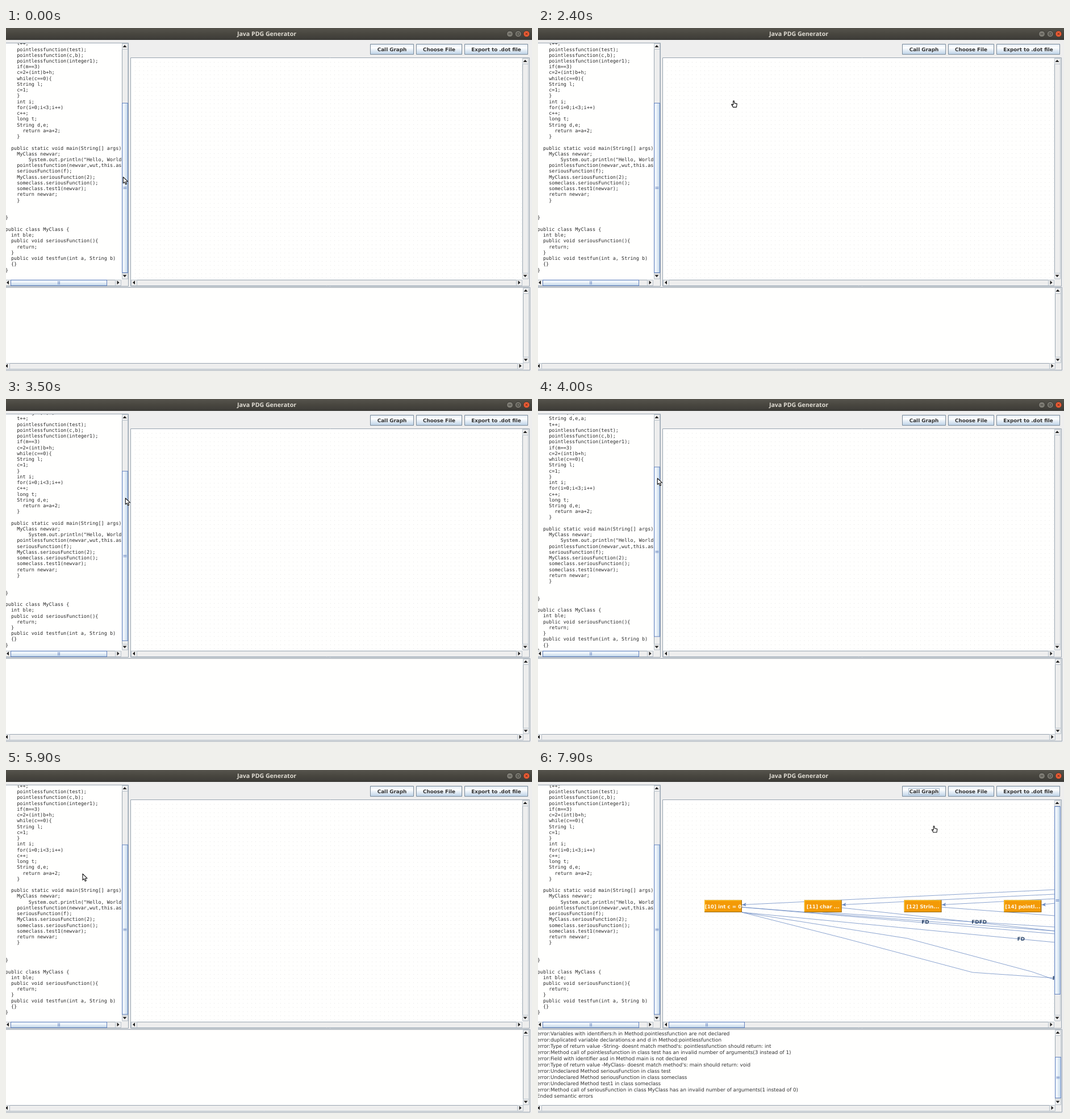
An HTML page with a canvas for the animation above (8000 ms loop, 926 px wide and 605 px high).

```html
<!DOCTYPE html>
<html lang="en">
<head>
<meta charset="utf-8">
<title>Java PDG Generator</title>
<style>
html, body { margin: 0; width: 100%; height: 100%; overflow: hidden; background: #eee; }
canvas { display: block; }
</style>
</head>
<body>
<canvas id="stage" width="926" height="605"></canvas>
<script>
const ctx = document.getElementById('stage').getContext('2d');
ctx.textRendering = 'geometricPrecision';
ctx.lineJoin = 'round';

const LOOP = 8000, STEP = 100, ROW = 10.237;
const EDGE = '#7a8a99', LINE = '#98a4b0', SOFT = '#b9c3cc', BLUE = '#6382bf';
const PALE = '#b8cfe5', PANEL = '#eeeeee', PAPER = '#fffffe', INK = '#282828';
const MONO = '8.5px "DejaVu Sans Mono", monospace';
const SANS = '8.75px "DejaVu Sans", sans-serif';
const BOLD = 'bold 8.8px "DejaVu Sans", sans-serif';
const TITLE = 'bold 10.6px "Open Sans", sans-serif';

const HIDDEN = 3; // code lines above the resting view
const code = `    char h,m;
    String d,e,a;
    t++;
    pointlessfunction(test);
    pointlessfunction(c,b);
    pointlessfunction(integer1);
    if(m==3)
    c=2+(int)b+h;
    while(c==0){
    String l;
    c=1;
    }
    int i;
    for(i=0;i<3;i++)
    c++;
    long t;
    String d,e;
      return a=a+2;
    }
    
  public static void main(String[] args) {
    MyClass newvar;
        System.out.println("Hello, World");
    pointlessfunction(newvar,wut,this.asd);
    seriousFunction(f);
    MyClass.seriousFunction(2);
    someclass.seriousFunction();
    someclass.test1(newvar);
    return newvar;
    }


}

public class MyClass {
  int ble;
  public void seriousFunction(){
    return;
  }
  public void testfun(int a, String b)
  {}
}`.split('\n');

const errors = `Variables with identifiers:h in Method:pointlessfunction are not declared
duplicated variable declarations:e and d in Method:pointlessfunction
Type of return value -String- doesnt match method's: pointlessfunction should return: int
Method call of pointlessfunction in class test has an invalid number of arguments(3 instead of 1)
Field with identifier asd in Method main is not declared
Type of return value -MyClass- doesnt match method's: main should return: void
Undeclared Method seriousFunction in class test
Undeclared Method seriousFunction in class someclass
Undeclared Method test1 in class someclass
Method call of seriousFunction in class MyClass has an invalid number of arguments(1 instead of 0)`
  .split('\n').map(s => 'error:' + s).concat('Ended semantic errors');

// Pointer trips: first step, last step, x, y reached
const trips = [
  [1, 3, 205, 270], [4, 6, 204, 265],
  [7, 15, 726, 72], [15, 19, 740, 38],     // over the graph to the buttons
  [20, 26, 206, 159], [27, 28, 205, 170],  // back to the scroll bar
  [29, 31, 210, 174], [37, 40, 210, 139], [40, 43, 210, 178],
  [43, 46, 104, 306], [46, 50, 82, 150], [50, 51, 82, 132],
  [53, 56, 89, 193], [58, 64, 706, 49], [65, 67, 696, 37],
  [75, 79, 697, 98]
];

function pointerAt(s) {
  let x = 206, y = 262;
  for (const [from, to, tx, ty] of trips) {
    const k = Math.min(1, Math.max(0, (s - from) / (to - from)));
    const ease = k * k * (3 - 2 * k);
    x += (tx - x) * ease;
    y += (ty - y) * ease;
  }
  return [x, y];
}

// Two drags of the scroll bar, up and back
function scrollAt(s) {
  const swing = (from, len, size) => size * Math.sin(Math.PI * (s - from) / len) ** 2;
  if (s < 29) return 0;
  if (s < 37) return swing(29, 8, 14.4);
  return s < 43 ? swing(37, 6, 17.4) : 0.7;
}

// The selection grows upwards from its last line
function selectionAt(s) {
  return s >= 47 && s < 54 ? Math.max(9, Math.round(26 - 16 * (s - 47) / 3)) : Infinity;
}

function box(x, y, w, h, fill) {
  ctx.fillStyle = fill;
  ctx.fillRect(x, y, w, h);
}

function frame(x, y, w, h, color) {
  ctx.strokeStyle = color;
  ctx.lineWidth = 1;
  ctx.strokeRect(x + 0.5, y + 0.5, w - 1, h - 1);
}

function text(str, x, y, font, color, align = 'left') {
  ctx.font = font;
  ctx.fillStyle = color;
  ctx.textAlign = align;
  ctx.fillText(str, x, y);
}

function poly(pts, fill, stroke, width = 1) {
  ctx.beginPath();
  pts.forEach(([x, y]) => ctx.lineTo(x, y));
  if (fill) {
    ctx.closePath();
    ctx.fillStyle = fill;
    ctx.fill();
  }
  if (stroke) {
    ctx.strokeStyle = stroke;
    ctx.lineWidth = width;
    ctx.stroke();
  }
}

function clipped(x, y, w, h, draw) {
  ctx.save();
  ctx.beginPath();
  ctx.rect(x, y, w, h);
  ctx.clip();
  draw();
  ctx.restore();
}

function ramp(x, y, ...colors) {
  const g = ctx.createLinearGradient(0, 0, x, y);
  colors.forEach((c, i) => g.addColorStop(i / (colors.length - 1), c));
  return g;
}

// A bar drawn downwards from the origin; thumb is [start, end] or nothing
function bar(len, thumb) {
  box(0, 0, 11, len, PANEL);
  frame(0, 0, 11, len, SOFT);
  box(0, 11, 1, len - 22, LINE);
  box(0, 10, 11, 1, SOFT);
  box(0, len - 11, 11, 1, SOFT);
  [[5, -1], [len - 5.5, 1]].forEach(([y, dir]) =>
    poly([[5, y + dir * 2], [8.5, y - dir * 2], [1.5, y - dir * 2]], '#222'));
  if (!thumb) return;
  const [a, b] = thumb, mid = (a + b) / 2;
  box(0, a, 11, b - a, BLUE);
  box(1, a + 1, 9, b - a - 2, ramp(11, 0, '#d3e2f0', '#f4f8fc', '#d6e4f1', PALE));
  for (let i = -1; i < 2; i++) box(2.5, mid + i * 1.5 - 0.3, 6, 0.7, BLUE);
}

function vBar(x, y, len, thumb) {
  ctx.save();
  ctx.translate(x, y);
  bar(len, thumb && thumb.map(v => v - y));
  ctx.restore();
}

function hBar(x, y, len, thumb) {
  ctx.save();
  ctx.transform(0, 1, 1, 0, x, y);
  bar(len, thumb && thumb.map(v => v - x));
  ctx.restore();
}

function titleBar() {
  box(0, 0, 926, 21, ramp(0, 21, '#56544d', '#48463f', '#3c3b37'));
  box(0, 20, 926, 1, '#32312d');
  text('Java PDG Generator', 459, 13.6, TITLE, '#dfdbd2', 'center');
  ['#7d7b73', '#7d7b73', '#ea5b34'].forEach((fill, i) => {
    ctx.beginPath();
    ctx.arc(887 + i * 14.7, 10.4, 5.5, 0, 7);
    ctx.fillStyle = fill;
    ctx.fill();
    ctx.strokeStyle = '#33322e';
    ctx.lineWidth = 0.8;
    ctx.stroke();
  });
  box(884.7, 10, 4.6, 1, '#3a3934');
  frame(899.3, 8, 5, 5, '#3a3934');
  for (const d of [-1.8, 1.8]) poly([[916.4 - d, 8.6], [916.4 + d, 12.2]], null, '#4a2114');
}

function button(label, x, w, [px, py], pressed, focus) {
  const y = 28, h = 19;
  const over = px >= x && px <= x + w && py >= y && py <= y + h;
  ctx.save();
  ctx.translate(x, y);
  box(0, 0, w, h, pressed ? PALE : ramp(0, h, '#dde8f3', '#ffffff', '#dde8f3', PALE));
  frame(0, 0, w, h, EDGE);
  if (over && !pressed) frame(1, 1, w - 2, h - 2, PALE);
  if (focus) frame(11, 4, w - 22, 12, '#a3b8cc');
  text(label, w / 2, 12.8, BOLD, '#333', 'center');
  ctx.restore();
}

function codePane(offset, selFrom) {
  box(0, 26, 216, 430, PANEL);
  frame(-1, 26, 217, 430, LINE);
  box(0, 27, 204, 417, PAPER);
  clipped(0, 27, 203, 416, () => {
    ctx.font = MONO;
    code.forEach((line, i) => {
      const n = i - HIDDEN, mid = 37.3 + n * ROW + offset;
      if (n >= selFrom && n <= 26) {
        box(0, mid - 5.2, ctx.measureText(line).width - 1.3, ROW + 0.1, PALE);
      }
      text(line, -1.3, mid + 3.2, MONO, INK);
    });
  });
  vBar(204, 27, 416, [132, 432].map(v => v - offset / 1.39));
  hBar(-2, 444, 205, [8, 178]);
}

function node(label, x) {
  const y = 229.5, w = 66, h = 21.5;
  box(x, y, w, h, '#9c6a10');
  box(x, y, w - 1.4, h - 1.4, '#ffc21f');
  box(x + 1.3, y + 1.3, w - 2.7, h - 2.7, '#f39a06');
  text(label, x + w / 2, 243.6, BOLD, '#fff8ea', 'center');
}

function graph() {
  const link = (...pts) => poly(pts, null, '#6d8cc4', 0.8);
  const labels = ['[10] int c = 0', '[11] char ...', '[12] Strin...', '[14] pointl...'];
  const left = i => 293 + i * 175.8, right = i => left(i) + 66;

  for (const end of [284, 289]) link([right(0), 242], [910, end]);
  link([right(0), 251], [910, 304]);
  link([right(0), 251], [540, 297], [765, 357], [910, 367]);
  link([right(0), 251], [650, 297], [870, 356], [910, 370]);
  link([left(1) + 32, 251], [910, 277]);
  link([right(1), 243], [910, 284]);
  link([right(2), 242], [910, 257]);

  labels.forEach((label, i) => {
    const x = right(i), y = 237.7;
    link([x, y], [910, 211 + i * 8]);
    poly([[x, y], [x + 7.5, y - 3.5], [x + 6, y], [x + 7.5, y + 2.8]], '#6d8cc4');
    node(label, left(i));
  });
  [[682, 271], [770, 271], [783.5, 271], [850.5, 300.5], [912.5, 369.5]].forEach(([x, y]) =>
    text('FD', x, y, BOLD, '#2b4468', 'center'));
}

function graphPane(ready) {
  box(219, 52, 703, 404, PANEL);
  frame(219, 52, 703, 404, LINE);
  box(220, 53, 690, 391, PAPER);
  clipped(220, 53, 689, 390, () => {
    for (let y = 60.3; y < 443; y += 7.31) {
      for (let x = 227.3; x < 909; x += 7.31) box(x, y, 0.7, 0.7, '#c8c8c8');
    }
    if (ready) graph();
  });
  vBar(909, 53, 390, ready && [64, 396]);
  hBar(220, 444, 689, ready && [230, 364]);
}

function logPane(ready) {
  box(0, 457, 923, 147, PANEL);
  frame(-1, 457, 924, 147, LINE);
  box(0, 459, 911, 132, PAPER);
  if (ready) errors.forEach((s, i) => text(s, -2, 467.9 + i * 10.98, SANS, '#303030'));
  vBar(910, 458, 133, ready && [506, 579]);
  hBar(-4, 591, 915);
}

function pointer(x, y) {
  const over = x > 220 && x < 909 && y > 53 && y < 443;
  const hand = [[-0.8, 1], [0.8, 1], [1.3, 5], [5.8, 6], [5, 12], [-1, 12], [-3.8, 7], [-0.8, 8], [-0.8, 1]];
  const arrow = [[0.3, 0.8], [0.3, 11.8], [2.8, 9.6], [4.6, 13.8], [6.5, 13], [4.8, 9], [8.3, 8.7], [0.3, 0.8]];
  ctx.save();
  ctx.translate(x, y);
  poly(over ? hand : arrow, '#fff', '#111', 1.1);
  ctx.restore();
}

function draw(ms) {
  const s = Math.floor(ms / STEP);
  const at = pointerAt(s);
  const ready = s >= 74;

  box(0, 0, 926, 605, PANEL);
  titleBar();
  button('Call Graph', 641, 77, at, s >= 70 && !ready, s >= 70);
  button('Choose File', 722, 81, at);
  button('Export to .dot file', 807, 112, at);
  codePane(scrollAt(s), selectionAt(s));
  graphPane(ready);
  logPane(ready);
  pointer(...at);
}

const start = performance.now();
function tick(now) {
  draw(Math.max(0, now - start) % LOOP);
  requestAnimationFrame(tick);
}
draw(0);
requestAnimationFrame(tick);
</script>
</body>
</html>
```
